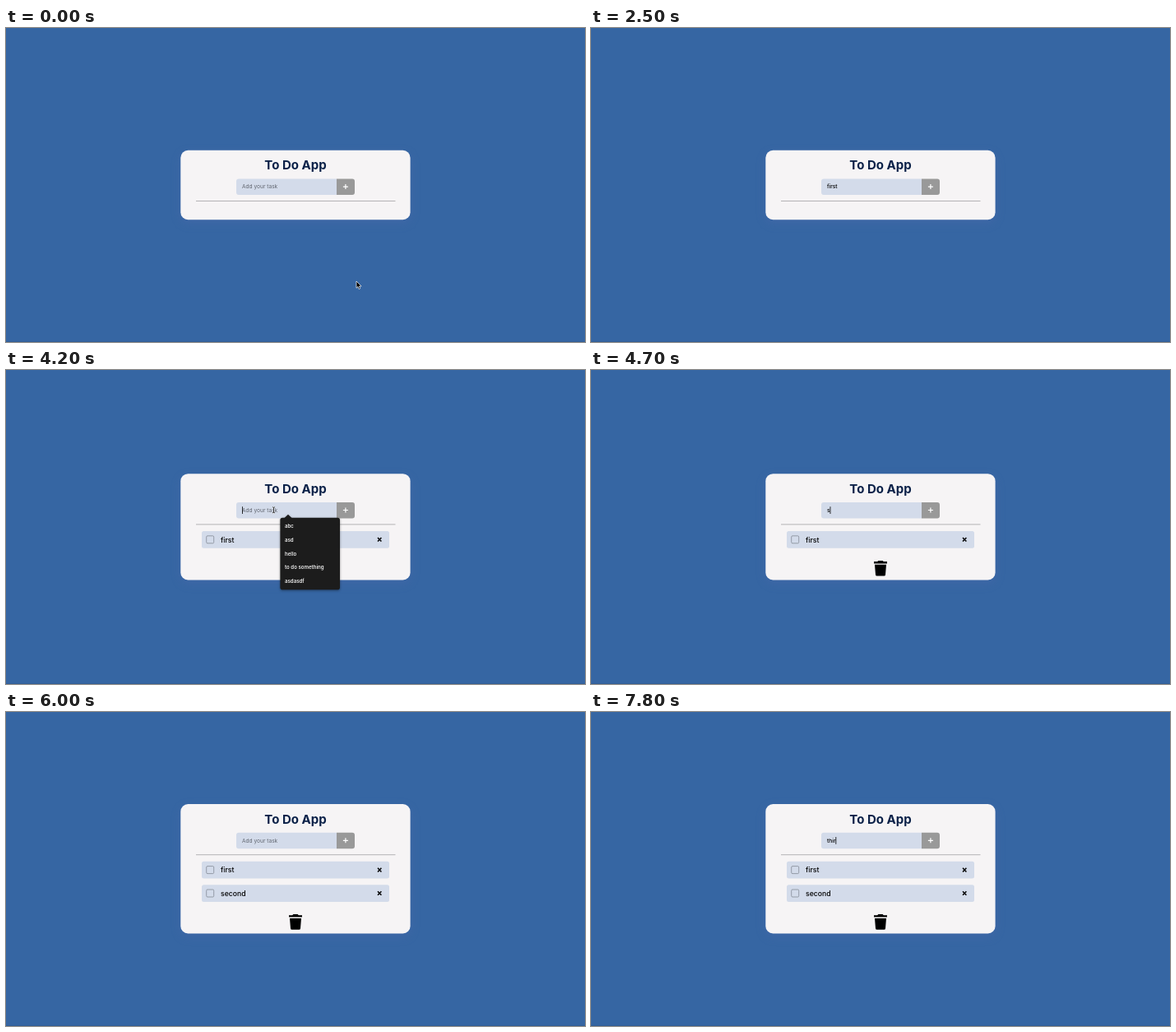
An HTML page that plays this animation: 704 px wide and 382 px high, repeating every 8 s.

```html
<!DOCTYPE html>
<html lang="en">
<head>
<meta charset="utf-8">
<title>To Do App</title>
<style>
  html, body { margin: 0; width: 100%; height: 100%; overflow: hidden; background: #3666a3; }
  svg { display: block; width: 100vw; height: 100vh; font-family: Inter, "Open Sans", sans-serif; }
  .card { fill: #f6f4f5; filter: drop-shadow(0 4px 6px rgba(95, 105, 180, .2)); }
  .title { font-size: 15px; font-weight: 700; fill: #0b2148; text-anchor: middle; }
  .field { fill: #d3dbea; }
  .entry { font-size: 6.6px; }
  .hint { fill: #626771; }
  .typed { font-weight: 500; }
  .task { font-size: 8.7px; font-weight: 450; }
  .menu { filter: drop-shadow(0 1px 1.5px rgba(0, 0, 0, .4)); }
  .menu text { font-size: 6.1px; font-weight: 600; fill: #eee; }
</style>
</head>
<body>
<svg viewBox="0 0 704 382">
  <defs>
    <g id="item">
      <rect class="field" x="238" width="228" height="20.8" rx="2.5"/>
      <rect x="243.7" y="5.8" width="9" height="9" rx="1.3" fill="none" stroke="#858b96" stroke-width=".8"/>
      <path d="M452 8l4.4 4.6m0-4.6l-4.4 4.6" stroke="#000" stroke-width="1.5" fill="none"/>
    </g>
  </defs>
  <rect width="704" height="382" fill="#3666a3"/>
  <rect y="381" width="704" height="1" fill="#315d96"/>
  <g id="app">
    <rect id="card" class="card" x="212.3" width="279.3" rx="9"/>
    <text class="title" x="352" y="23.6">To Do App</text>
    <path class="field" d="M402 34.7v19.5H283a3 3 0 0 1-3-3v-13.500a3 3 0 0 1 3-3z"/>
    <path fill="#999" d="M402 34.700h19a3 3 0 0 1 3 3v13.500a3 3 0 0 1-3 3h-19z"/>
    <path d="M409.900 44.300h6m-3-3v6" stroke="#fff" stroke-width="1.200"/>
    <path d="M231 61.700h242.500" stroke="#b4b3b5" stroke-width="1"/>
    <text id="hint" class="entry hint" x="287" y="46.600">Add your task</text>
    <text id="typed" class="entry typed" x="287" y="46.600"></text>
    <rect id="caret" y="40" width=".8" height="8.800"/>
    <g id="items"></g>
    <g id="trash">
      <path d="M344 1.200h4.200l1.200-1.200h5.200l1.200 1.200h4.200v2.300h-16z"/>
      <path d="M345 4.800h14l-1 12.300q-.1 1.600-1.700 1.600h-8.600q-1.600 0-1.700-1.600z"/>
    </g>
    <g id="menu" class="menu">
      <path d="M338 54.200l5-4.700 5 4.700z" fill="#1c1c1c"/>
      <rect x="333.400" y="53.600" width="72.600" height="87.400" rx="2.800" fill="#1c1c1c"/>
    </g>
  </g>
  <path id="arrow" d="M0 0v8.300l1.900-1.700 1.300 3 1.500-.7-1.300-2.800h2.700z" stroke="#fff" stroke-width=".7" stroke-linejoin="round"/>
  <g id="beam" fill="none">
    <path d="M-1.500-3.500q1.500 0 1.500.8v5.400q0 .8-1.500.8m3-7q-1.500 0-1.500.8m0 5.400q0 .8 1.500.8" stroke="#fff" stroke-opacity=".7" stroke-width="1.700"/>
    <path d="M-1.500-3.500q1.500 0 1.500.8v5.400q0 .8-1.500.8m3-7q-1.500 0-1.500.8m0 5.400q0 .8 1.500.8" stroke="#111" stroke-width=".8"/>
  </g>
</svg>
<script>
const LOOP = 8000;
const TASKS = ['first', 'second'];
const OPTIONS = ['abc', 'asd', 'hello', 'to do something', 'asdasdf'];
// Card top and height by number of tasks.
const LAYOUTS = [[148.800, 84.400], [126.200, 129.300], [112, 157.500]];

const arrow = (x, y) => ({ pointer: ['arrow', x, y] });
const beam = (x, y) => ({ pointer: ['beam', x, y] });
const key = text => ({ text, caret: true, pointer: null });
const closing = text => ({ text, menu: false });
const submit = count => ({ count, text: '', caret: false, menu: false, pointer: null });

// Each step keeps whatever it does not change.
const STEPS = [
  [0, { ...submit(0), ...arrow(426, 308) }],
  [100, arrow(423, 294)],
  [200, arrow(401, 242)],
  [300, arrow(379, 206)],
  [400, beam(370.500, 193.500)],
  [600, { caret: true }],
  [700, { menu: true }],
  [1100, { caret: false }],
  [1400, key('f')],
  [1500, closing('fi')],
  [1700, key('fir')],
  [1800, key('firs')],
  [2000, key('first')],
  [2500, { caret: false }],
  [3000, submit(1)],
  [3800, arrow(367, 192)],
  [3900, arrow(352, 184)],
  [4000, beam(333, 173)],
  [4100, { ...beam(325.500, 170.300), caret: true }],
  [4200, { menu: true }],
  [4600, key('s')],
  [4700, closing('s')],
  [4900, key('se')],
  [5100, key('sec')],
  [5200, key('seco')],
  [5300, key('secon')],
  [5500, key('second')],
  [5700, { caret: false }],
  [5900, submit(2)],
  [6400, arrow(325, 170)],
  [6500, arrow(322, 167)],
  [6600, beam(317, 160)],
  [6700, beam(312.500, 155)],
  [6800, { ...beam(310.500, 153.300), caret: true }],
  [6900, { menu: true }],
  [7400, key('t')],
  [7500, closing('th')],
  [7700, key('thi')],
  [7800, key('thir')]
];

const $ = id => document.getElementById(id);
const show = (id, on) => $(id).setAttribute('display', on ? 'inline' : 'none');
const move = (el, x, y) => el.setAttribute('transform', `translate(${x} ${y})`);

function add(parent, tag, attrs, text = '') {
  const el = document.createElementNS('http://www.w3.org/2000/svg', tag);
  for (const name in attrs) el.setAttribute(name, attrs[name]);
  el.textContent = text;
  return parent.appendChild(el);
}

OPTIONS.forEach((text, i) => add($('menu'), 'text', { x: 339, y: 65.900 + i * 16.750 }, text));
const rows = TASKS.map((text, i) => {
  const row = add($('items'), 'g', {});
  move(row, 0, 69.800 + i * 28.400);
  add(row, 'use', { href: '#item' });
  add(row, 'text', { class: 'task', x: 261, y: 13.500 }, text);
  return row;
});

function stateAt(time) {
  const state = {};
  for (const [start, change] of STEPS) {
    if (start > time) break;
    Object.assign(state, change);
  }
  return state;
}

function draw({ count, text, caret, menu, pointer }) {
  const [top, height] = LAYOUTS[count];
  move($('app'), 0, top);
  $('card').setAttribute('height', height);
  rows.forEach((row, i) => row.setAttribute('display', i < count ? 'inline' : 'none'));
  show('trash', count > 0);
  move($('trash'), 0, 77.300 + count * 28.400);

  $('typed').textContent = text;
  show('hint', !text);
  show('caret', caret);
  $('caret').setAttribute('x', 287 + (text ? $('typed').getComputedTextLength() : 0));
  show('menu', menu);

  for (const shape of ['arrow', 'beam']) {
    const on = pointer !== null && pointer[0] === shape;
    show(shape, on);
    if (on) move($(shape), pointer[1], pointer[2]);
  }
}

const origin = performance.now();
function tick() {
  draw(stateAt((performance.now() - origin) % LOOP));
  requestAnimationFrame(tick);
}
tick();
</script>
</body>
</html>
```
